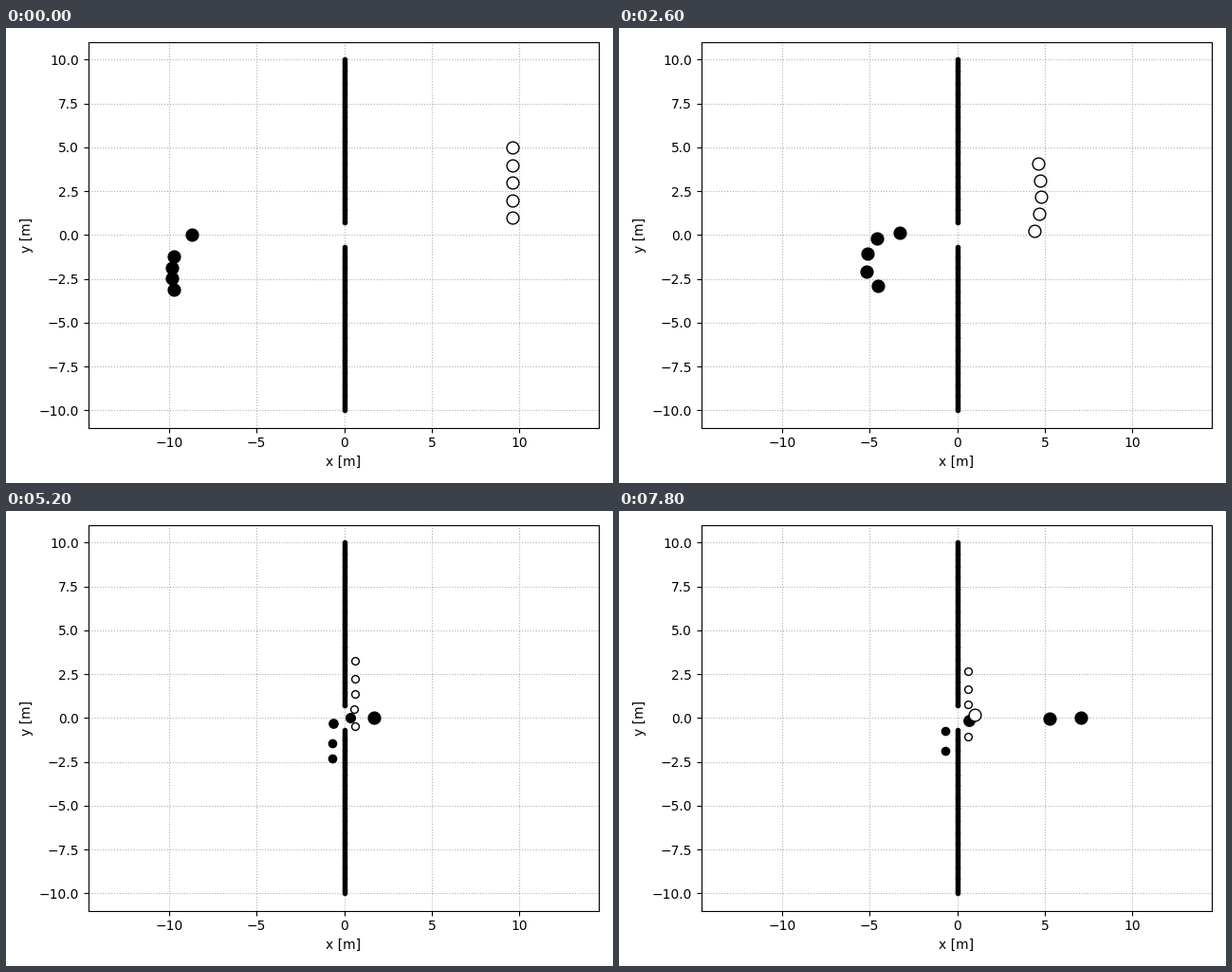
Recreate the animation shown at these times as a matplotlib script. Size 640x480 px, loop 8 s.

```python
import numpy as np
import matplotlib.pyplot as plt
from matplotlib.animation import FuncAnimation

FRAMES = 40
INTERVAL = 200
GAP = 0.7            # half width of the doorway
FULL, SMALL = 9.2, 5.6
STOP = 0.62          # where a walker comes to rest against the wall
SLIDE = -0.045       # metres per frame along the wall

fig, ax = plt.subplots(figsize=(6.4, 4.8), dpi=100)
ax.set_xlabel("x [m]")
ax.set_ylabel("y [m]")
ax.set_xlim(-14.6, 14.52)
ax.set_ylim(-11, 11)
ax.grid(linestyle=":")
for side in (-1, 1):
    wall = side * np.linspace(GAP, 10, 94)
    ax.plot(np.zeros_like(wall), wall, "k.")
fig.tight_layout()

walkers = []


def walker(face, *points):
    """Walk straight between (frame, x, y) points."""
    dot, = ax.plot([], [], "o", mfc=face, mec="k", mew=1, zorder=3)
    walkers.append((dot, np.array(points).T))


# Right-bound group: squeeze at the start, then queue for the doorway
walker("k", (0, -8.66, 0.04), (18, -1.21, 0.13), (22, 0.07, 0.03),
       (39, 7.05, 0.04))
walker("k", (0, -9.74, -1.20), (5, -7.80, -0.51), (22, -0.94, 0.10),
       (30, 1.64, -0.06), (39, 5.29, -0.01))
walker("k", (0, -9.80, -1.89), (5, -8.11, -1.43), (22, -1.80, -0.62),
       (25, -0.72, -0.43), (30, -0.32, 0.07), (39, 0.66, -0.14))
walker("k", (0, -9.80, -2.45), (5, -8.12, -2.37), (22, -1.80, -1.75),
       (25, -0.68, -1.51), (39, -0.68, -0.72))
walker("k", (0, -9.73, -3.13), (5, -7.76, -3.31), (22.5, -0.68, -2.42),
       (39, -0.68, -1.89))

# Left-bound group: march in a column, hit the wall, slide down along it
hits = [(23.4, 3.36), (24.1, 2.32), (24.2, 1.45), (23.8, 0.56), (22.5, -0.33)]
for i, (t, y) in enumerate(hits):
    if i == 3:       # bumped away in front of the doorway
        rest = [(30, 0.53, 0.34), (39, 1.01, 0.17)]
    else:
        rest = [(39, STOP, y + SLIDE * (39 - t))]
    walker("w", (0, 9.58, 4.98 - i), (t, STOP, y), *rest)


def draw(n):
    for dot, (t, xs, ys) in walkers:
        x, y = np.interp(n, t, xs), np.interp(n, t, ys)
        room = np.hypot(x, max(GAP - abs(y), 0))
        dot.set_data([x], [y])
        dot.set_markersize(np.interp(room, [0.65, 0.95], [SMALL, FULL]))
    return [dot for dot, _ in walkers]


anim = FuncAnimation(fig, draw, frames=FRAMES, interval=INTERVAL,
                     repeat=True, repeat_delay=0)
plt.show()
```
